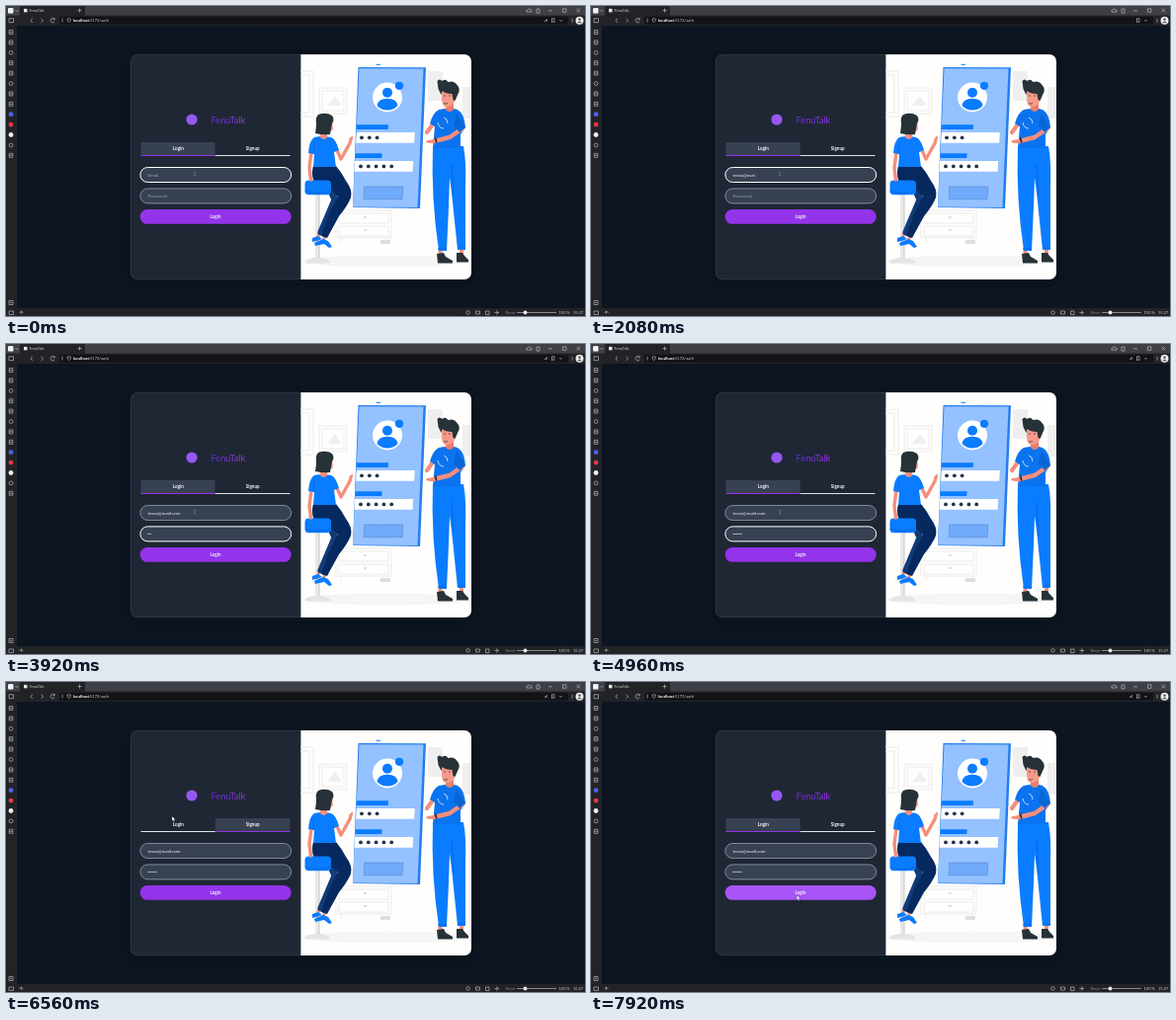
Recreate the animation shown at these times as an HTML page. Size 586x314 px, loop 8000 ms.

```html
<!DOCTYPE html>
<html lang="en">
<head>
<meta charset="utf-8">
<title>Login demo</title>
<style>
html,body{margin:0;width:100%;height:100%;overflow:hidden;background:#0d1521}
svg{display:block;width:586px;height:314px}
text{font-family:Lato,"Open Sans",sans-serif;font-size:4.6px;fill:#f4f6f9}
.mid{text-anchor:middle}
.ui{font-size:4px;fill:#c9cacf}
.icon{fill:none;stroke:#b4b5ba;stroke-width:.7}
.pale{fill:none;stroke:#ebebeb;stroke-width:1}
.limb{fill:none;stroke-linecap:round;stroke-linejoin:round}
.skin{stroke:#f48e7c}
</style>
</head>
<body>
<svg viewBox="0 0 586 314">
<defs>
  <linearGradient id="brand"><stop stop-color="#6428d0"/><stop offset="1" stop-color="#9333ea"/></linearGradient>
  <clipPath id="cardClip"><rect x="126" y="49" width="345" height="228" rx="7"/></clipPath>
  <filter id="soft" x="-10%" y="-10%" width="120%" height="125%"><feGaussianBlur stdDeviation="4"/></filter>
</defs>
<rect width="586" height="314" fill="#0d1521"/>

<!-- browser frame -->
<rect width="586" height="10" fill="#3f4046"/>
<rect x="14" width="66" height="10" fill="#222327"/>
<rect y="9.5" width="586" height="10.5" fill="#222327"/>
<rect x="54" y="10.7" width="515" height="8" rx="1.5" fill="#121317"/>
<rect y="20" width="11" height="287" fill="#222327"/>
<rect y="306" width="586" height="8" fill="#222327"/>
<rect x="2" y="2" width="5.5" height="5.5" rx="1" fill="#eef0f3"/>
<path d="M9.5 4l1.4 1.5L12.3 4" class="icon"/>
<rect x="18" y="2.8" width="3.5" height="3.5" fill="#e3e5e9"/>
<text x="23.5" y="6.2" class="ui">FenuTalk</text>
<g class="icon">
  <path d="M72.5 4.5h4M74.5 2.5v4M527 6h5q1-2-1-2.3-2-2-3 .3-2 0-1 2zM537 3h3v4h-3zM549 4.8h4M563.5 2.8h3.5v3.5h-3.5zM577.5 2.7l3.6 3.6m0-3.6l-3.6 3.6"/>
  <path d="M3 12.7h4.5v4H3zM27 12.7l-2.2 2 2.2 2M35.5 12.7l2.2 2-2.2 2M49 13.2a2.2 2.2 0 1 0 .2 2.4M49.2 12v1.8h-1.8"/>
  <path d="M57 12.5v4M62 13q1.5 0 1.8-.6.4.6 1.6.6 0 2.8-1.7 3.6-1.7-.8-1.7-3.6zM552.5 12.7h2.5v4l-1.2-1-1.3 1zM560.2 14l1.3 1.4 1.3-1.4M573 12.7v4"/>
</g>
<path id="key" d="M547.8 13.6l-2.5 2m1.4-1l.8.8" stroke="#d6dae0" stroke-width=".9" fill="none"/>
<text x="68" y="16.2" class="ui"><tspan font-weight="bold" fill="#fff">localhost</tspan>:5173/auth</text>
<circle cx="580.5" cy="14.7" r="4" fill="#f0f0ee"/>
<circle cx="580.5" cy="13.6" r="1.4" fill="#606570"/><path d="M577.8 17.2q2.7-3.2 5.4 0z" fill="#606570"/>
<g id="side"></g>
<g class="icon">
  <path d="M3 298.5h4v4H3zM4 300.5h2M3 309h4.5v3.5H3zM13.5 310.5q2-2.4 4 0M15.5 309v3"/>
  <circle cx="467.5" cy="310.5" r="1.8"/><path d="M475.5 309h4v3h-4zM485.5 309h3.5v3.5h-3.5zM494.5 310.5h4m-2.5-2l2.5 2-2.5 2"/>
  <path d="M517 310.5h40"/>
</g>
<circle cx="525.5" cy="310.5" r="2" fill="#e5e8ed"/>
<text x="505.5" y="312" class="ui" style="fill:#85868c">Reset</text>
<text x="559.5" y="312" class="ui">100 %</text>
<text x="574" y="312" class="ui">15:27</text>

<!-- card -->
<rect x="126" y="52" width="345" height="229" rx="8" fill="#060b13" opacity=".4" filter="url(#soft)"/>
<g clip-path="url(#cardClip)">
  <rect x="126" y="49" width="173" height="228" fill="#1f2734"/>
  <rect x="298.4" y="49" width="173" height="228" fill="#fffefc"/>

  <!-- room -->
  <g class="pale">
    <path d="M298 66h13v46h-13M298 70h9v38h-9M317 83h28v26h-28zM320 86h22v20h-22z"/>
    <path d="M334 207h56v28h-56zM337 210h50v10h-50zM337 223h50v10h-50zM339 235v5M386 235v5"/>
  </g>
  <path d="M325 101l8-10 7 10zM427 66h15v30h-15zM462 82h9v32h-9z" fill="#efefef"/>
  <path d="M362 214h3M362 227h3" stroke="#d5d5d5" stroke-width="1.5"/>
  <path d="M379 237h10v4h-10z" fill="#dedede"/>
  <ellipse cx="385" cy="258.5" rx="86" ry="6" fill="#f5f5f5"/>

  <!-- big form -->
  <path d="M356.5 62L425 62.3 419 205 351 204z" fill="#247eee"/>
  <path d="M357.5 63.2L422.5 63.5 416.5 204 351 203.5z" fill="#94c1ff"/>
  <path d="M374.5 59.3h4.5" stroke="#0a7cff" stroke-width="1"/>
  <circle cx="386" cy="92.5" r="15" fill="#fff"/>
  <circle cx="386" cy="87.8" r="5" fill="#0a7cff"/>
  <path d="M375.5 101q1-7.2 10.5-7.2t10.5 7.2q-4.5 4.5-10.5 4.5t-10.5-4.5z" fill="#0a7cff"/>
  <circle cx="398" cy="80.8" r="4.1" fill="#0a7cff"/>
  <path d="M355 120.3h32l-.3 4.8h-32zM353.6 149.3h27l-.3 4.8h-27z" fill="#0a7cff"/>
  <path d="M354.8 128h59l-.6 10.8h-59zM353 157h59.2l-.6 10.8h-59z" fill="#fff"/>
  <g id="formDots" fill="#24354a"></g>
  <path d="M362.8 183h39l-.7 12.7h-39z" fill="#70aafa"/>
  <path d="M362.8 183h39l-.7 12.7h-39z" fill="none" stroke="#3b6fae" stroke-width=".6" stroke-dasharray="1.5 1"/>

  <!-- seated woman -->
  <path d="M313 190h4.5v66h-4.5z" fill="#e8e8e8"/><path d="M316 190h1.5v66h-1.5z" fill="#d5d5d5"/>
  <path d="M303 259q2-4 12-4t13 4v1.5h-25z" fill="#e4e4e4"/>
  <path d="M317 229l-2 8M323 232l-2 7" class="limb skin" stroke-width="3"/>
  <path d="M310 235l6-2 4 3-6 2-4 1zM312 240l9-4 5 2 4 6-3 1-5-4-9 2z" fill="#0a7cff"/>
  <path d="M322 172l11 24-14 33" class="limb" stroke="#123c78" stroke-width="7"/>
  <path d="M311 162h23q6 7 10 15 7 9 5 17-3 8-12 19l-12 22-6-2 8-23 9-17-10-9q-13-1-15-8-2-7 0-14z" fill="#06295f"/>
  <rect x="302.5" y="176.5" width="26.5" height="14.8" rx="4" fill="#0a7cff"/>
  <path d="M303 187.5q12 4 25.5 0" fill="none" stroke="#0567dc" stroke-width="1"/>
  <path d="M334 144l5 11 9-16" class="limb skin" stroke-width="3.4"/>
  <path d="M346.5 139l1-5 3-2.5.7 1.5-1.5 6z" fill="#f48e7c"/>
  <path d="M309 148l-2 16 1.5 12" class="limb skin" stroke-width="3.4"/>
  <path d="M312 133q8-2 17 0 5 2 8 13l-5 2 2 15h-23l1-13-6-1q1-13 6-16z" fill="#0a7cff"/>
  <path d="M312 138l-1 12" stroke="#0567dc" stroke-width=".7"/>
  <path d="M318 125h7v8q-3 4-7 0z" fill="#f48e7c"/>
  <path d="M323 115h7l1 10q-3 4-8 1z" fill="#f59a8a"/>
  <path d="M316 110q8-3 14 1 3 4 0 8l-2 11q-7 1-15-1 1-6 1-11-1-5 2-8z" fill="#263238"/>

  <!-- standing man -->
  <path d="M439.500 245v8M461 245v7" class="skin" stroke-width="4"/>
  <path d="M436 251l7-1 2 4 7 4v2.500h-15zM456 250h6l2 3 4 4v2.500h-12z" fill="#263238"/>
  <path d="M432 142h31q3 16 2 40v65h-8l-6-58-2-15-1 30-2 44h-8q-8-54-6-106z" fill="#0a7cff"/>
  <path d="M451 160l2 34M437 246h9M457 245h8" fill="none" stroke="#0567dc" stroke-width=".9"/>
  <path d="M434 117l-8 11" class="limb skin" stroke-width="4.200"/>
  <path d="M438 105q13-3 19 0 7 4 8 18l-5 7v14h-28l2-22-5-3q3-11 9-14z" fill="#0a73ef"/>
  <path d="M462 124l-13 9-16 4" class="limb skin" stroke-width="4.500"/>
  <path d="M434 135l-8 1-1 2 4 1 6 0z" fill="#f48e7c"/>
  <path d="M456 108l9 15-6 5-6-7z" fill="#0866d7"/>
  <path d="M434.500 133.500l1.300 5" stroke="#263238" stroke-width="1.800"/>
  <path d="M437 118q1 6 6 6M443 113q4 1 4 6" fill="none" stroke="#cfe4ff" stroke-width=".9"/>
  <path d="M445 96h8v9q-4 4-8 0z" fill="#e97e6c"/>
  <path d="M441 85h13v12q-3 6-9 5-4-1-4-8z" fill="#f59a8a"/>
  <path d="M440.500 90l-3-6-1-8q2-3 5 0 3-3 6 1 6-2 9 3 4 4 1 9l-3 7-2-1-1-6q-7 0-10-3z" fill="#263238"/>
  <path d="M443 91h2m3 0h2M443 98.500q2 1.400 4 0" stroke="#263238" stroke-width=".7" fill="none"/>

  <!-- auth panel -->
  <g id="head">
    <circle cx="188" cy="115" r="5.600" fill="#9657f3"/>
    <text x="207.500" y="118.600" style="font-size:9.200px;fill:url(#brand)">FenuTalk</text>
    <rect id="tab0" x="136.500" y="138" width="75.300" height="13.500"/>
    <rect id="tab1" x="211.800" y="138" width="75.700" height="13.500"/>
    <path id="line0" d="M136.500 151.500h75.300"/>
    <path id="line1" d="M211.800 151.500h75.700"/>
    <text class="mid" x="174.300" y="146.300" font-weight="bold">Login</text>
    <text class="mid" x="249.700" y="146.300" font-weight="bold">Signup</text>
  </g>
  <g id="fields"></g>
  <g id="button">
    <rect id="pill" x="135.700" y="-7.400" width="153" height="14.800" rx="7.400"/>
    <text id="label" class="mid" x="212" y="1.600" font-weight="bold"></text>
  </g>
</g>
<path d="M298 49.200H133a7 7 0 0 0-6.800 7V270a7 7 0 0 0 6.800 6.800H298" fill="none" stroke="#6a7484" stroke-width=".4" opacity=".6"/>
<path id="beam" d="M190.300 168.500h1.400M191 168.500v3.400M190.300 171.900h1.400" stroke="#aab2be" stroke-width=".4" fill="none"/>
<path id="arrow" d="M0 0v4.700l1.100-1 .8 1.800.9-.4-.8-1.800h1.500z" fill="#fff" stroke="#111" stroke-width=".25"/>
</svg>
<script>
const NS = 'http://www.w3.org/2000/svg', LOOP = 8000;
const $ = id => document.getElementById(id);
const set = (el, attrs) => { for (const k in attrs) el.setAttribute(k, attrs[k]); };
const add = (parent, tag, attrs) => {
  const el = document.createElementNS(NS, tag);
  set(el, attrs);
  parent.appendChild(el);
  return el;
};
const clamp = (v, a, b) => Math.max(a, Math.min(b, v));
const ramp = (t, from, span) => clamp((t - from) / span, 0, 1);
const mix = (a, b, k) => `rgb(${a.map((v, i) => Math.round(v + (b[i] - v) * k))})`;

const EMAIL = 'tessa@ovail.com';
const PURPLE = [147, 51, 234], LILAC = [168, 85, 247], WHITE = [224, 228, 234];
const PANEL = [31, 39, 52], ACTIVE = [55, 65, 81], DARK = [10, 10, 20], VIOLET = [50, 15, 90];

// Sidebar icons
for (let i = 0; i < 13; i++) {
  const y = 26.5 + i * 10.4, tint = {8: '#4b63e8', 9: '#e53945', 10: '#eceef2'}[i];
  if (tint) add($('side'), 'circle', {cx: 5, cy: y, r: 2.4, fill: tint});
  else if (i % 3 == 2) add($('side'), 'circle', {cx: 5, cy: y, r: 1.9, class: 'icon'});
  else add($('side'), 'path', {d: `M3.2 ${y - 2}h3.6v4h-3.6zM3.2 ${y}h3.6`, class: 'icon'});
}
// Dots in the illustrated form
[[3, 360, 133.3], [5, 359, 162.4]].forEach(([n, x, y]) => {
  for (let i = 0; i < n; i++) add($('formDots'), 'circle', {cx: x + i * 7.8, cy: y, r: 1.9});
});

const fields = ['Email', 'Password', 'Confirm Password'].map(hint => {
  const g = add($('fields'), 'g', {});
  const box = add(g, 'rect', {x: 135.9, y: -7.5, width: 152.8, height: 15, rx: 7.5, fill: '#374151'});
  const text = add(g, 'text', {x: 143.5, y: 1.5});
  const dots = [0, 1, 2, 3, 4].map(i => add(g, 'circle', {cx: 144.2 + i * 1.95, cy: 0, r: .6, fill: '#f4f6f9'}));
  return {g, box, text, dots, hint};
});

function drawField(f, y, value, focused, count = 0) {
  set(f.g, {transform: `translate(0 ${y})`});
  set(f.box, {stroke: focused ? '#fff' : '#b9c5d0', 'stroke-width': focused ? 1 : .6});
  f.text.textContent = value || (count ? '' : f.hint);
  f.text.style.fill = value ? '#f4f6f9' : '#94a1b3';
  f.dots.forEach((d, i) => set(d, {visibility: i < count ? 'visible' : 'hidden'}));
}

const PATH = [[5240, 191, 170], [5600, 249, 143], [5740, 247, 144], [5920, 239, 146.3], [6100, 222, 146],
  [6440, 171, 139], [6560, 168, 136], [6720, 170, 140], [7160, 204, 205], [7420, 208.3, 216]];
function pointer(t) {
  const i = PATH.findIndex(p => p[0] > t);
  if (i < 1) return PATH[i < 0 ? PATH.length - 1 : 0].slice(1);
  const [a, b] = [PATH[i - 1], PATH[i]];
  let k = (t - a[0]) / (b[0] - a[0]);
  k = k * k * (3 - 2 * k);
  return [a[1] + (b[1] - a[1]) * k, a[2] + (b[2] - a[2]) * k];
}

function drawTabs(t) {
  const on = ramp(t, 5640, 240) * (1 - ramp(t, 6600, 240));
  const settle = ramp(t, 5960, 160);
  set($('tab0'), {fill: mix(ACTIVE, PANEL, on)});
  set($('tab1'), {fill: mix(PANEL, ACTIVE, on)});
  const dimming = t < 5960, back = t >= 6600;
  set($('line0'), {stroke: back ? mix(PURPLE, WHITE, on) : dimming ? mix(PURPLE, DARK, on) : mix(DARK, WHITE, settle)});
  set($('line1'), {stroke: back ? mix(WHITE, PURPLE, on) : dimming ? mix(WHITE, VIOLET, on) : mix(VIOLET, PURPLE, settle)});
}

function render(t) {
  const signup = t >= 5680 && t < 6520;
  const typed = t < 1200 ? Math.floor((t - 80) / 180) : 6 + Math.floor((t - 1200) / 210);
  const count = clamp(Math.floor((t - 3440) / 200), 0, 5);
  const y = signup ? 162.7 : 171;
  set($('head'), {transform: `translate(0 ${signup ? -10.7 : 0})`});
  drawTabs(t);
  drawField(fields[0], y, EMAIL.slice(0, clamp(typed, 0, EMAIL.length)), t < 3400);
  drawField(fields[1], y + 21.4, '', t >= 3400 && t < 5600, count);
  drawField(fields[2], y + 42.8, '', false);
  set(fields[2].g, {visibility: signup ? 'visible' : 'hidden'});

  set($('button'), {transform: `translate(0 ${signup ? 226.6 : 213.4})`});
  set($('pill'), {fill: mix(PURPLE, LILAC, ramp(t, 7170, 150))});
  $('label').textContent = signup ? 'Signup' : 'Login';

  set($('key'), {visibility: t < 400 || t >= 3640 ? 'visible' : 'hidden'});
  const moved = t >= 5240, [px, py] = pointer(t);
  set($('beam'), {visibility: moved ? 'hidden' : 'visible'});
  set($('arrow'), {visibility: moved ? 'visible' : 'hidden', transform: `translate(${px} ${py})`});
}

const start = performance.now();
function tick() {
  render((performance.now() - start) % LOOP);
  requestAnimationFrame(tick);
}
tick();
</script>
</body>
</html>
```
